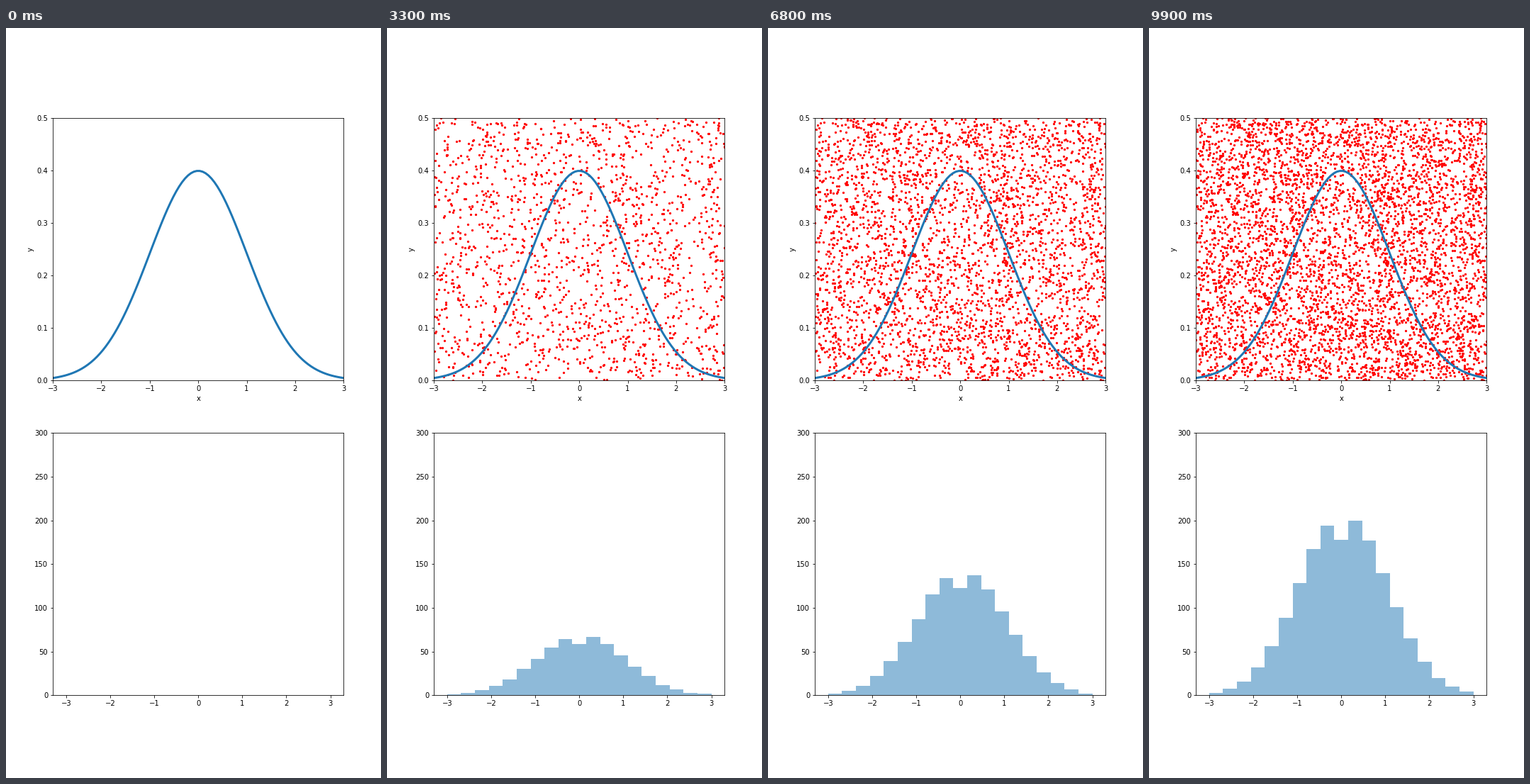
Recreate the animation shown at these times as a matplotlib script. Size 529 by 1058 pixels, loop 10 s.

```python
import numpy as np
import matplotlib.pyplot as plt
from matplotlib.animation import FuncAnimation

W, H, DPI = 529, 1058, 72
FRAMES, INTERVAL = 100, 100
TOTAL = 50 * (FRAMES - 1)
Y_MAX = 0.5
EDGES = np.linspace(-3, 3, 20)

rng = np.random.default_rng(7)


def pdf(x):
    return np.exp(-x ** 2 / 2) / np.sqrt(2 * np.pi)


def bin_totals():
    """Final bar heights: a bell leaning right with a notch in the middle."""
    x = (EDGES[:-1] + EDGES[1:]) / 2
    lean = 1 + 0.05 * x
    notch = 1 - 0.15 * np.exp(-(x / 0.2) ** 2)
    return np.rint(210 * np.exp(-x ** 2 / 2) * lean * notch).astype(int)


def arrivals(n):
    """Evenly paced arrival times in 0..1 with a little jitter."""
    return (np.arange(n) + rng.random(n)) / n


def accepted(counts):
    """Points under the curve, with a fixed number in every bin."""
    x = rng.uniform(np.repeat(EDGES[:-1], counts), np.repeat(EDGES[1:], counts))
    times = np.concatenate([arrivals(n) for n in counts])
    return np.column_stack([x, rng.uniform(0, pdf(x)), times])


def rejected(n):
    """Points spread evenly over the area above the curve."""
    pts = rng.uniform((-3, 0), (3, Y_MAX), (2 * n, 2))
    pts = pts[pts[:, 1] > pdf(pts[:, 0])][:n]
    return np.column_stack([pts, arrivals(n)])


counts = bin_totals()
hits = accepted(counts)
misses = rejected(TOTAL - counts.sum())
points = np.vstack([hits, misses])

fig, (top, bottom) = plt.subplots(2, 1, figsize=(W / DPI, H / DPI), dpi=DPI)
fig.subplots_adjust(left=0.125, right=0.9003, bottom=0.1102, top=0.8803,
                    hspace=0.2)

grid = np.linspace(-3, 3, 100)
top.plot(grid, pdf(grid), lw=3, color="C0")
dots = top.scatter([], [], s=5, color="red")
top.set(xlim=(-3, 3), ylim=(0, Y_MAX), xlabel="x", ylabel="y")

bars = bottom.bar(EDGES[:-1], np.zeros(len(counts)), width=np.diff(EDGES),
                  align="edge", color="C0", alpha=0.5)
bottom.set(xlim=(-3.3, 3.3), ylim=(0, 300))


def update(i):
    now = i / (FRAMES - 1)
    dots.set_offsets(points[points[:, 2] <= now, :2])
    heights, _ = np.histogram(hits[hits[:, 2] <= now, 0], EDGES)
    for bar, height in zip(bars, heights):
        bar.set_height(height)
    return [dots, *bars]


def init():
    return update(0)


anim = FuncAnimation(fig, update, frames=FRAMES, init_func=init,
                     interval=INTERVAL, repeat=True, repeat_delay=0)
plt.show()
```
